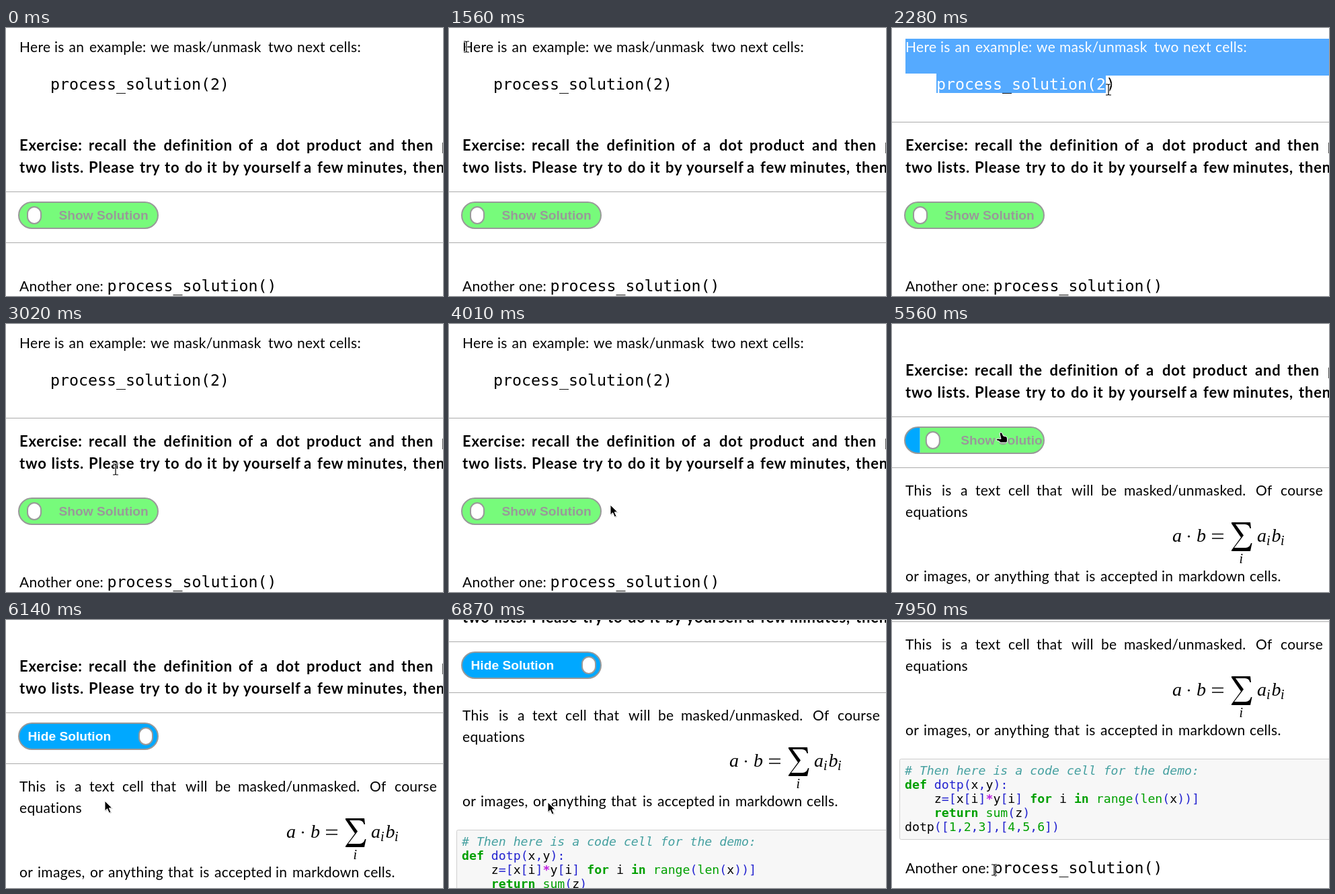
An HTML page that plays this animation: 650 by 400 pixels, repeating every 7990 ms.

```html
<!DOCTYPE html>
<html lang="en">
<head>
<meta charset="utf-8">
<title>Masked notebook cells</title>
<style>
  html, body { margin: 0; width: 100%; height: 100%; overflow: hidden; background: #fff; }
  svg { display: block; width: 650px; height: 400px; }
  text { white-space: pre; }
  .sans { font: 21px Lato, "Open Sans", sans-serif; letter-spacing: .3px; }
  .bold { font-weight: 700; font-size: 22px; letter-spacing: .8px; }
  .mono { font: 23.25px "DejaVu Sans Mono", monospace; }
  .label { font: bold 19.2px "Liberation Sans", Arial, sans-serif; }
  .math { font: italic 28px "Liberation Serif", serif; }
  .sub { font-size: 20px; }
  .code { font: 18.2px "DejaVu Sans Mono", monospace; fill: #000; }
  .comment { fill: #45a0a0; font-style: italic; }
  .keyword { fill: #00a000; font-weight: bold; }
  .builtin, .number { fill: #00a000; }
  .operator { fill: #c020e0; font-weight: bold; }
  .name, .punct { fill: #2424d0; }
</style>
</head>
<body>
<svg id="stage" viewBox="0 0 650 400"></svg>
<script>
const LOOP = 7990;
const SCROLL_TICK = 53;
const CLICK = 5460;
const clamp = v => Math.min(1, Math.max(0, v));
const progress = (t, from, to) => clamp((t - from) / (to - from));

// ---- markup helpers ----
const text = (x, y, cls, str) => `<text x="${x}" y="${y}" class="${cls}">${str}</text>`;

const words = (y, str, xs, cls = "") => `<text y="${y}" class="sans ${cls}">` +
  str.split(" ").map((w, i) => `<tspan x="${xs[i]}">${w}</tspan>`).join("") + "</text>";

const rule = y => `<rect y="${y}" width="650" height="1" fill="#ababab"/>`;

const knob = (id, x) =>
  `<rect id="${id}" x="${x - 10}" y="7" width="20" height="25" rx="10" fill="#fff" stroke="#999" stroke-width="2"/>`;

const frame = '<rect x="19" width="207" height="39" rx="19.5" fill="none" stroke="#999" stroke-width="2"/>';

const hideFace = '<rect x="18" width="209" height="39" fill="#00a8ff"/>' +
  '<text x="32.5" y="26" class="label" fill="#fff">Hide Solution</text>';

const showFace = '<rect x="227" width="209" height="39" fill="#77fb7b"/>' +
  '<text x="287.5" y="26" class="label" fill="#999">Show Solution</text>';

const TOKENS = new RegExp([
  "(?<comment>#.*)", "(?<name>(?<=def )\\w+)", "(?<keyword>\\b(?:def|for|in|return)\\b)",
  "(?<builtin>\\b(?:range|len|sum)\\b)", "(?<number>\\d+)", "(?<operator>\\*)", "(?<punct>[\\[\\](),:=]+)"
].join("|"), "g");

const highlight = line => line.replace(TOKENS, (match, ...rest) => {
  const groups = rest[rest.length - 1];
  const cls = Object.keys(groups).find(k => groups[k] !== undefined);
  return `<tspan class="${cls}">${match}</tspan>`;
});

// ---- page content, in unscrolled coordinates ----
const intro =
  words(36, "Here is an example: we mask/unmask two next cells:", [20, 72, 93.5, 124, 215, 249, 390, 433, 481]) +
  text(66, 92, "mono", "process_solution(2)");

const exercise =
  words(183, "Exercise: recall the definition of a dot product and then print",
    [20, 123, 189, 234.5, 346, 378, 402, 447, 540, 588, 648], "bold") +
  words(216, "two lists. Please try to do it by yourself a few minutes, then",
    [20, 67.5, 123, 199, 236, 266, 299, 322, 353, 443, 463, 507, 605], "bold");

const formula =
  text(417, 431, "math", "a") + '<circle cx="441.5" cy="423" r="1.6"/>' + text(453, 431, "math", "b") +
  '<path d="M476 419.5h17M476 426h17" stroke="#000" stroke-width="1.6"/>' +
  '<path d="M505 402H533L534 411H532.5Q531 405 525 405H511L523 421.5L509 440H526Q532 440 534 433H535.5L533 445H505V443.5L519 424.5L505 404Z"/>' +
  text(516.5, 463, "math sub", "i") +
  text(543, 431, "math", "a") + text(557, 436, "math sub", "i") +
  text(564.5, 431, "math", "b") + text(578, 436, "math sub", "i");

const code = [
  "# Then here is a code cell for the demo:",
  "def dotp(x,y):",
  "    z=[x[i]*y[i] for i in range(len(x))]",
  "    return sum(z)",
  "dotp([1,2,3],[4,5,6])"
].map((line, i) => text(19, 549 + 21 * i, "code", highlight(line))).join("");

const solution =
  words(362, "This is a text cell that will be masked/unmasked. Of course",
    [20, 74, 102, 124, 173, 215, 267, 311, 345, 541, 578]) +
  words(394, "equations", [20]) + formula +
  words(490, "or images, or anything that is accepted in markdown cells.",
    [20, 47, 125, 152, 241, 288, 310, 401, 426, 532]) +
  '<rect x="11.5" y="525.5" width="660" height="120" rx="2" fill="#f7f7f7" stroke="#cfcfcf"/>' + code;

const another =
  words(393, "Another one:", [20, 104]) + text(150.5, 393, "mono", "process_solution()") +
  `<g transform="translate(0 437)"><g clip-path="url(#pill)">${hideFace}</g>${frame}${knob("", 208)}</g>`;

const beam = "M-4-8H-1L0-7L1-8H4M0-7V7M-4 8H-1L0 7L1 8H4";
const arrow = "M0 0V15L3.6 11.7L6.3 18L9 16.8L6.3 10.8H11Z";
const cursors =
  `<g id="arrow"><path d="${arrow}" transform="translate(1 1)" opacity=".25"/>` +
  `<path d="${arrow}" stroke="#fff" stroke-width="1"/></g>` +
  `<g id="ibeam" fill="none"><path d="${beam}" stroke="#fff" stroke-width="3"/>` +
  `<path d="${beam}" stroke="#000" stroke-width="1.2"/></g>` +
  '<path id="hand" d="M-2 0Q0-2.5 2 0L3.5 4L8 5Q9.5 6 9.5 9V12L8.5 14H-1L-2.5 12L-7 10.5Q-7.5 8-4.5 8L0 8.5Z" fill="#000" stroke="#fff" stroke-width="1"/>';

document.getElementById("stage").innerHTML = `
  <defs>
    <clipPath id="pill"><rect x="19" width="207" height="39" rx="19.5"/></clipPath>
    <clipPath id="selClip"><path id="selShape"/></clipPath>
  </defs>
  <rect width="650" height="400" fill="#fff"/>
  <g id="page">
    <g id="introRule">${rule(140)}</g>
    <g id="buttonRules">${rule(244)}${rule(320)}</g>
    ${intro}
    <path id="selFill" fill="#55aaff"/>
    <g fill="#fff" clip-path="url(#selClip)">${intro}</g>
    ${exercise}
    <g transform="translate(0 260)">
      <g clip-path="url(#pill)"><g id="faces">${hideFace}${showFace}</g></g>
      ${frame}${knob("knob", 42)}
    </g>
    <g id="solution">${solution}</g>
    <g id="another">${another}</g>
  </g>
  <g id="cursor">${cursors}</g>`;

const el = id => document.getElementById(id);
const show = (id, on) => el(id).setAttribute("display", on ? "inline" : "none");
const move = (id, x, y) => el(id).setAttribute("transform", `translate(${x} ${y})`);

// ---- motion ----
// time, x, y, and the pointer shape used from then on
const PATH = [
  [920, 648, 60, "ibeam"], [1240, 240, 17, "ibeam"], [1560, 26, 28, "ibeam"], [1700, 26, 28, "ibeam"],
  [2280, 322, 92, "ibeam"], [2560, 322, 92, "ibeam"], [3060, 150, 228, "arrow"], [3200, 100, 260, "hand"],
  [3340, 82, 266, "hand"], [3460, 80, 267, "hand"], [3860, 80, 267, "hand"], [3970, 227, 270, "arrow"],
  [4010, 240, 270, "arrow"], [4680, 240, 270, "arrow"], [4950, 180, 188, "hand"], [5070, 162, 160, "hand"],
  [5400, 162, 163, "hand"], [5990, 162, 163, "hand"], [6060, 146, 215, "arrow"], [6140, 147, 270, "arrow"],
  [7050, 147, 272, "ibeam"], [7680, 147, 272, "ibeam"], [7950, 152, 373, "ibeam"]
];

// time and share of one wheel tick
const JUMPS = [[6400, .7], [6530, .3], [6790, .7], [6870, .3], [7050, 1], [7240, 1]];

function pointerAt(t) {
  let i = PATH.findIndex(k => k[0] > t) - 1;
  if (i < -1) i = PATH.length - 1;
  if (i < 0) return null;
  const [t0, x0, y0, shape] = PATH[i];
  const [t1, x1, y1] = PATH[i + 1] || [LOOP, x0, y0];
  const k = progress(t, t0, t1);
  return { x: x0 + (x1 - x0) * k, y: y0 + (y1 - y0) * k, shape };
}

function scrollAt(t) {
  const k = progress(t, 4090, 4440);
  const ticks = 2 * k * (2 - k) + JUMPS.reduce((sum, [at, n]) => sum + (t >= at ? n : 0), 0);
  return Math.round(ticks * SCROLL_TICK);
}

function selectionAt(t, p) {
  if (t < 1720 || t >= 2590) return "";
  if (p.y < 60) return `M20 16H${Math.max(20, p.x)}V43H20Z`;
  const chars = Math.max(0, Math.min(19, Math.round((p.x - 66) / 14)));
  return `M20 16H650V71H${66 + 14 * chars}V97H66V68H20Z`;
}

function draw(t) {
  const p = pointerAt(t);
  const introActive = t >= 1680 && t < CLICK;
  const open = t >= CLICK;
  const flip = progress(t, CLICK, 5760) ** 2;
  const selection = selectionAt(t, p);

  move("page", 0, -scrollAt(t));
  show("introRule", introActive);
  show("buttonRules", !introActive);
  show("solution", open);
  move("another", 0, open ? 303 : 0);
  move("faces", -209 * (1 - flip), 0);
  move("knob", 166 * flip, 0);
  el("selFill").setAttribute("d", selection);
  el("selShape").setAttribute("d", selection);

  show("cursor", p);
  if (p) {
    move("cursor", Math.round(p.x), Math.round(p.y));
    for (const shape of ["arrow", "ibeam", "hand"]) show(shape, shape === p.shape);
  }
}

const start = performance.now();
function tick() {
  draw((performance.now() - start) % LOOP);
  requestAnimationFrame(tick);
}
tick();
</script>
</body>
</html>
```
